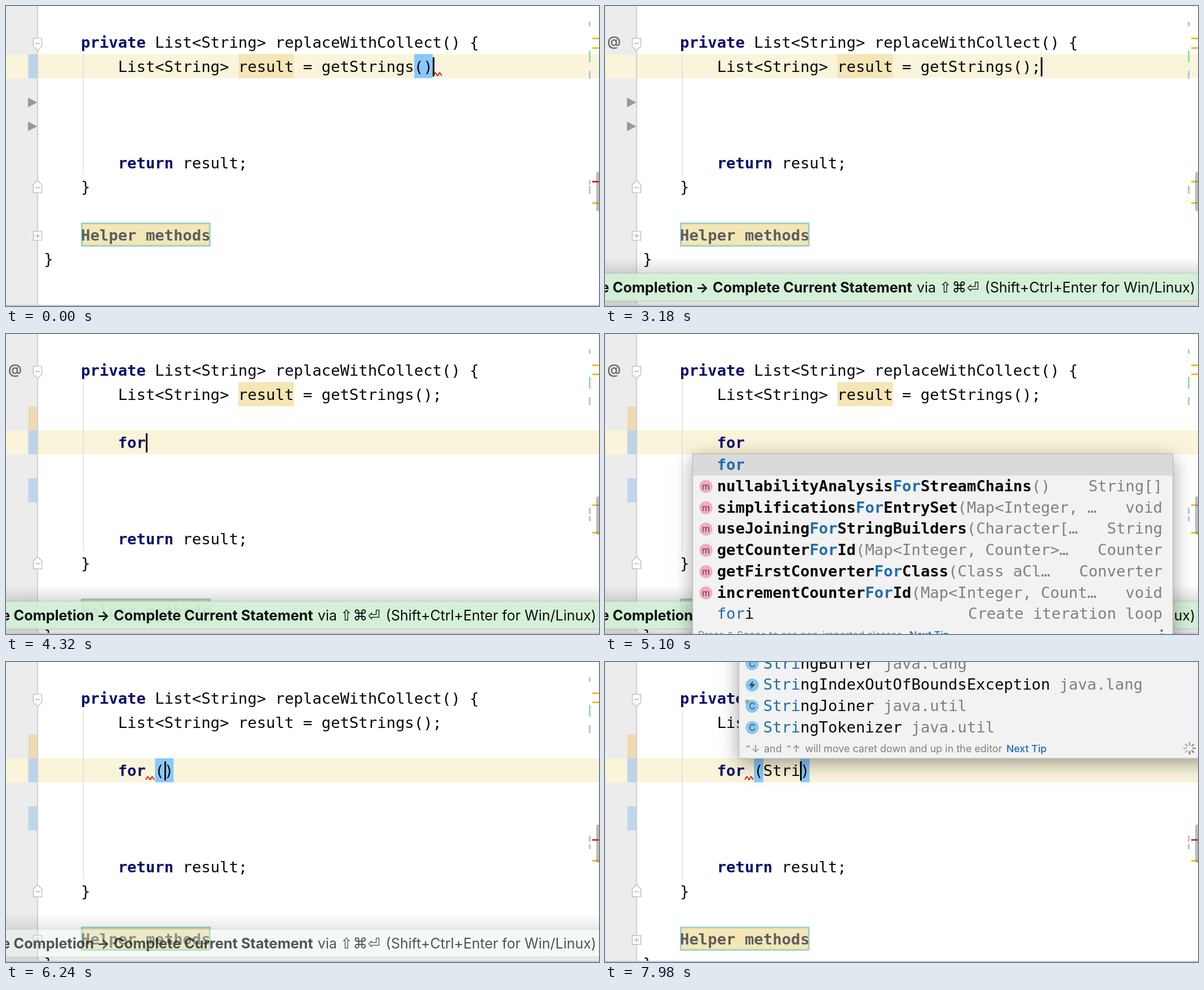
Animation, 1052 px wide and 532 px high, one loop 8 s. Source, as an HTML page with a canvas:

```html
<!DOCTYPE html>
<html lang="en">
<head>
<meta charset="utf-8">
<title>Code completion</title>
<style>
html, body { margin: 0; width: 100%; height: 100%; overflow: hidden; background: #fff; }
canvas { display: block; }
</style>
</head>
<body>
<canvas id="stage" width="1052" height="532"></canvas>
<script>
const ctx = document.getElementById('stage').getContext('2d');
const W = 1052, H = 532, LOOP = 8000, STEP = 60;
const CELL = 16.42, LEFT = 133, ROW = 42.67;
const MONO = '"DejaVu Sans Mono", "Noto Sans Mono", monospace';
const SANS = 'Inter, Roboto, sans-serif';
const SYMBOL = '"DejaVu Sans", sans-serif';
const NAVY = '#0c0c6e', GRAY = '#808080', BLUE = '#1f6cb0', PAREN = '#89c9fd';
const SAND = '#f5e6b5', ROWTINT = '#faf5da', YELLOW = '#f2bd1d', LAVENDER = '#b9bdea';

const T = {
  semicolon: 2520, banner: 2640, analysed: 2760, enter: 3240, enter2: 3360,
  f: 3840, o: 4020, r: 4200, list: 4440, accept: 5760, error: 5820,
  fade: 6060, S: 6840, t: 7020, types: 7080, r2: 7200, i: 7500
};
const caretResets = [-320, T.semicolon, T.analysed, T.enter, T.enter2, T.f, T.o, T.r,
  T.accept, T.S, T.t, T.r2, T.i];

const members = [
  ['nullabilityAnalysis', 'StreamChains', '()', 'String[]'],
  ['simplifications', 'EntrySet', '(Map<Integer, …', 'void'],
  ['useJoining', 'StringBuilders', '(Character[…', 'String'],
  ['getCounter', 'Id', '(Map<Integer, Counter>…', 'Counter'],
  ['getFirstConverter', 'Class', '(Class aCl…', 'Converter'],
  ['incrementCounter', 'Id', '(Map<Integer, Count…', 'void']
];
const classes = [
  ['StringBuffer', 'java.lang'],
  ['StringIndexOutOfBoundsException', 'java.lang'],
  ['StringJoiner', 'java.util'],
  ['StringTokenizer', 'java.util']
];

const col = c => LEFT + c * CELL;
const rowTop = r => ROW * r;
const clamp = v => Math.max(0, Math.min(1, v));

function rect(x, y, w, h, color) {
  ctx.fillStyle = color;
  ctx.fillRect(x, y, w, h);
}

function text(s, x, y, font, color, align = 'left') {
  ctx.font = font;
  ctx.fillStyle = color;
  ctx.textAlign = align;
  ctx.fillText(s, x, y);
}

function mono(s, x, y, color = '#080808', bold = false, align = 'left') {
  text(s, x, y, `${bold ? 700 : 400} 27.27px ${MONO}`, color, align);
}

const sans = (s, x, y, size, color, weight = 400, align = 'left') =>
  text(s, x, y, `${weight} ${size}px ${SANS}`, color, align);

const code = (s, c, r, color, bold) => mono(s, col(c), rowTop(r) + 31.5, color, bold);

function path(points, color, width, close) {
  ctx.beginPath();
  points.forEach(([x, y]) => ctx.lineTo(x, y));
  if (close) ctx.closePath();
  ctx.strokeStyle = color;
  ctx.lineWidth = width;
  ctx.stroke();
}

function circle(x, y, r, color) {
  ctx.beginPath();
  ctx.arc(x, y, r, 0, Math.PI * 2);
  ctx.fillStyle = color;
  ctx.fill();
}

function squiggle(x, y) {
  ctx.beginPath();
  for (let d = 0; d <= 15; d += 0.5) ctx.lineTo(x + d, y + 2.5 * Math.cos(d * Math.PI / 3.8));
  ctx.strokeStyle = '#d0140c';
  ctx.lineWidth = 1.8;
  ctx.stroke();
}

// dir 1 points down, -1 points up, 0 is the collapsed box
function foldMark(y, dir) {
  const shape = dir
    ? [[48.5, y - 9 * dir], [63.5, y - 9 * dir], [63.5, y + 5 * dir], [56, y + 12.5 * dir], [48.5, y + 5 * dir]]
    : [[48.5, y - 8], [63.5, y - 8], [63.5, y + 8], [48.5, y + 8]];
  ctx.beginPath();
  shape.forEach(([x, v]) => ctx.lineTo(x, v));
  ctx.closePath();
  ctx.fillStyle = '#fff';
  ctx.fill();
  path(shape, '#c6c6c6', 1.7, true);
  path([[52, y], [60, y]], '#b8b8b8', 1.7);
  if (!dir) path([[56, y - 4], [56, y + 4]], '#b8b8b8', 1.7);
}

function gutter(t, extra) {
  if (t >= T.analysed && t < T.error) sans('@', 16, 70.5, 24, '#6b6b6b', 600, 'center');
  if (!extra) {
    if (t < T.semicolon) rect(39.5, rowTop(2), 16, ROW, '#bcd3eb');
    for (const y of [171, 213.5]) {
      ctx.beginPath();
      ctx.moveTo(39, y - 8.5);
      ctx.lineTo(55.5, y);
      ctx.lineTo(39, y + 8.5);
      ctx.fillStyle = '#999';
      ctx.fill();
    }
  } else {
    rect(39.5, rowTop(3), 16, ROW, '#f0dab2');
    rect(39.5, rowTop(4), 16, ROW, '#bcd3eb');
    rect(39.5, rowTop(6), 16, ROW, '#bfd6ed');
  }
}

function stripes(t, extra) {
  const tick = (y, h, color) => rect(1034, y, 3, h, color);
  const bar = (y, color) => rect(1040, y, 12, 3, color);
  const lift = extra ? 3 : 0;
  tick(28 - lift / 3, 8, '#c2c2c2');
  tick(79 - lift, 21, '#98dcaa');
  tick(115 - lift, 14, LAVENDER);
  bar(extra ? 54 : 56, YELLOW);
  bar(73 - lift, YELLOW);
  if (extra) {
    tick(308, 11, LAVENDER);
    tick(323, 9, LAVENDER);
    if (t < T.error) bar(302, YELLOW);
    else bar(314, '#c93a1c');
    bar(351, YELLOW);
  } else {
    if (t < T.analysed) tick(309, 8, LAVENDER);
    tick(319, 14, '#c2c2c2');
    bar(310, t < T.analysed ? '#cc2a12' : YELLOW);
    bar(348, YELLOW);
  }
  ctx.beginPath();
  ctx.roundRect(1047, extra ? 288 : 294, 12, extra ? 68 : 70, 4);
  ctx.fillStyle = 'rgba(110,100,95,.43)';
  ctx.fill();
}

function caret(t, c, r) {
  const last = caretResets.filter(v => v <= t).pop();
  if ((t - last) % 1000 < 500) rect(Math.round(col(c)), rowTop(r) + 5.5, 3, 34, '#000');
}

function forLine(t) {
  if (t < T.f) return 4;
  if (t < T.accept) {
    const typed = t < T.o ? 'f' : t < T.r ? 'fo' : 'for';
    const done = typed.length === 3;
    code(typed, 4, 4, done ? NAVY : '#080808', done);
    return 4 + typed.length;
  }
  const arg = 'Stri'.slice(0, prefixLength(t));
  const end = 9 + arg.length;
  rect(col(8), rowTop(4), CELL, ROW, PAREN);
  rect(col(end), rowTop(4), CELL, ROW, PAREN);
  code('for', 4, 4, NAVY, true);
  code('(' + arg + ')', 8, 4);
  if (t >= T.error) squiggle(col(7), 206);
  return end;
}

const prefixLength = t => [T.S, T.t, T.r2, T.i].filter(v => v <= t).length;

function editor(t) {
  const extra = t < T.enter ? 0 : t < T.enter2 ? 1 : 2;
  const caretRow = 2 + extra;
  rect(0, 0, W, H, '#fff');
  rect(0, 0, 56, H, '#ececec');
  rect(0, rowTop(caretRow), W, ROW, ROWTINT);
  gutter(t, extra);
  rect(55.2, 0, 1.7, H, '#c9c9c9');
  rect(136.5, rowTop(2), 1.3, rowTop(5 + extra), '#d9d9d9');

  foldMark(66.5, 1);
  foldMark(322 + rowTop(extra), -1);
  foldMark(407.5 + rowTop(extra), 0);

  code('private', 0, 1, NAVY, true);
  code('List<String> replaceWithCollect() {', 8, 1);
  if (t < T.error) rect(col(17), rowTop(2), CELL * 6, ROW, SAND);
  if (t < T.semicolon) rect(col(36), rowTop(2), CELL * 2, ROW, PAREN);
  code('List<String> result = getStrings()' + (t < T.semicolon ? '' : ';'), 4, 2);
  if (t < T.semicolon) squiggle(758, 121);

  code('return', 4, 6 + extra, NAVY, true);
  code('result;', 11, 6 + extra);
  code('}', 0, 7 + extra);
  const y = rowTop(9 + extra);
  rect(LEFT, y, CELL * 14, ROW, SAND);
  ctx.strokeStyle = '#9bd6c4';
  ctx.lineWidth = 3;
  ctx.strokeRect(LEFT + 1.5, y + 1.5, CELL * 14 - 3, ROW - 3);
  code('Helper methods', 0, 9 + extra, '#5b5e61', true);
  code('}', -4, 10 + extra);

  const end = extra < 2 ? 4 : forLine(t);
  caret(t, extra ? end : t < T.semicolon ? 38 : 39, caretRow);
  stripes(t, extra);
}

function banner(t) {
  const fade = 1 - (t - T.fade) / 600;
  const a = Math.min(clamp((t - T.banner) / 300), clamp(fade));
  if (!a) return;
  const shade = ctx.createLinearGradient(0, 446, 0, 474);
  shade.addColorStop(0, 'rgba(0,0,0,0)');
  shade.addColorStop(1, 'rgba(0,0,0,.13)');
  ctx.globalAlpha = a;
  rect(0, 446, W, 28, shade);
  rect(0, 523, W, 9, 'rgba(0,0,0,.12)');
  ctx.globalAlpha = a * 0.4;
  rect(0, 474, W, 49, '#e6e8e4');
  ctx.globalAlpha = 0.88 * a ** 6;
  rect(0, 474, W, 49, '#d0efd5');
  ctx.globalAlpha = a;
  rect(0, 473.5, W, 1, 'rgba(120,140,120,.35)');
  rect(0, 522.5, W, 1, 'rgba(120,140,120,.35)');
  const y = 507.5, ink = '#0b0f0b';
  sans('e Completion', 156, y, 25.3, ink, 700, 'right');
  sans('→', 161, y, 24, ink, 700);
  sans('Complete Current Statement', 191, y, 25.3, ink, 700);
  sans('via', 553, y, 25, ink);
  [...'⇧⌘⏎'].forEach((s, i) => text(s, 604 + i * 24.5, y, `26px ${SYMBOL}`, ink, 'center'));
  sans('(Shift+Ctrl+Enter for Win/Linux)', 1047, y, 25, ink, 400, 'right');
  ctx.globalAlpha = 1;
}

function panel(x, y, w, h) {
  ctx.save();
  ctx.shadowColor = 'rgba(0,0,0,.38)';
  ctx.shadowBlur = 32;
  ctx.shadowOffsetY = 8;
  rect(x, y, w, h, '#f2f2f2');
  ctx.restore();
  ctx.strokeStyle = '#b9b9b9';
  ctx.lineWidth = 1.2;
  ctx.strokeRect(x, y, w, h);
}

function badge(x, y, letter, color) {
  circle(x, y, 11.5, color);
  sans(letter, x, y + 5.5, 16, '#45474a', 400, 'center');
}

function memberList() {
  panel(155.5, 212.5, 852, 360);
  rect(156, 213, 851, 38, '#dadada');
  const pitch = 37.75, x = col(4);
  mono('for', x, 241, BLUE, true);
  members.forEach(([head, tail, args, type], i) => {
    const y = 241 + pitch * (i + 1);
    const at = n => x + n * CELL;
    const n = head.length;
    badge(179, y - 8.5, 'm', '#f6abba');
    mono(head, x, y, '#080808', true);
    mono('For', at(n), y, BLUE, true);
    mono(tail, at(n + 3), y, '#080808', true);
    mono(args, at(n + 3 + tail.length), y, GRAY);
    mono(type, 989, y, GRAY, false, 'right');
  });
  const y = 241 + pitch * 7;
  mono('for', x, y, BLUE);
  mono('i', x + CELL * 3, y);
  mono('Create iteration loop', 989, y, GRAY, false, 'right');
  sans('Press', 165, 540, 17.5, GRAY);
  text('⌃', 215, 540, `17px ${SYMBOL}`, GRAY);
  sans('Space to see non-imported classes', 527, 540, 17.5, GRAY, 400, 'right');
  sans('Next Tip', 540, 540, 17.5, BLUE, 500);
  circle(987.5, 526, 2.2, '#6e6e6e');
  circle(987.5, 533, 2.2, '#6e6e6e');
}

function spinner(t) {
  const lead = Math.floor(t / 120) % 8;
  for (let i = 0; i < 8; i++) {
    const a = i * Math.PI / 4, age = (lead - i + 8) % 8;
    const p = r => [1037 + r * Math.cos(a), 153 + r * Math.sin(a)];
    const g = 125 + age * 9;
    path([p(5), p(11)], `rgb(${g},${g},${g})`, 2.6);
  }
}

function classList(t) {
  panel(237.5, -200, 900, 371);
  const n = prefixLength(t), x = col(9);
  classes.forEach(([name, pkg], i) => {
    const y = 11.5 + 37.75 * i;
    if (i === 1) {
      circle(261, y - 8.5, 11.5, '#86c8f4');
      ctx.beginPath();
      [[263, -16], [255, -7], [260, -7], [258, -1], [267, -10], [261.5, -10]]
        .forEach(([px, py]) => ctx.lineTo(px, y + py));
      ctx.fillStyle = '#45474a';
      ctx.fill();
    } else {
      badge(261, y - 8.5, 'C', '#86c8f4');
    }
    if (i === 2) {
      circle(252.5, y - 16.5, 4, '#a5a8aa');
    }
    mono(name.slice(0, n), x, y, BLUE);
    mono(name.slice(n), x + n * CELL, y);
    mono(pkg, x + (name.length + 1) * CELL, y, GRAY);
  });
  const y = 159.5;
  text('⌃', 247, y, `17px ${SYMBOL}`, GRAY);
  sans('↓', 260, y, 17.5, GRAY);
  sans('and', 282, y, 18, GRAY);
  text('⌃', 319, y, `17px ${SYMBOL}`, GRAY);
  sans('↑', 332, y, 17.5, GRAY);
  sans('will move caret down and up in the editor', 355, y, 18, GRAY);
  sans('Next Tip', 712, y, 17.8, BLUE, 500);
  spinner(t);
}

function draw(now) {
  const t = Math.floor((now % LOOP) / STEP) * STEP;
  editor(t);
  banner(t);
  rect(0, 530, W, 2, '#c8c8c8');
  if (t >= T.list && t < T.accept) memberList();
  if (t >= T.types) classList(t);
}

const start = performance.now();
function tick() {
  draw(performance.now() - start);
  requestAnimationFrame(tick);
}
tick();
</script>
</body>
</html>
```
